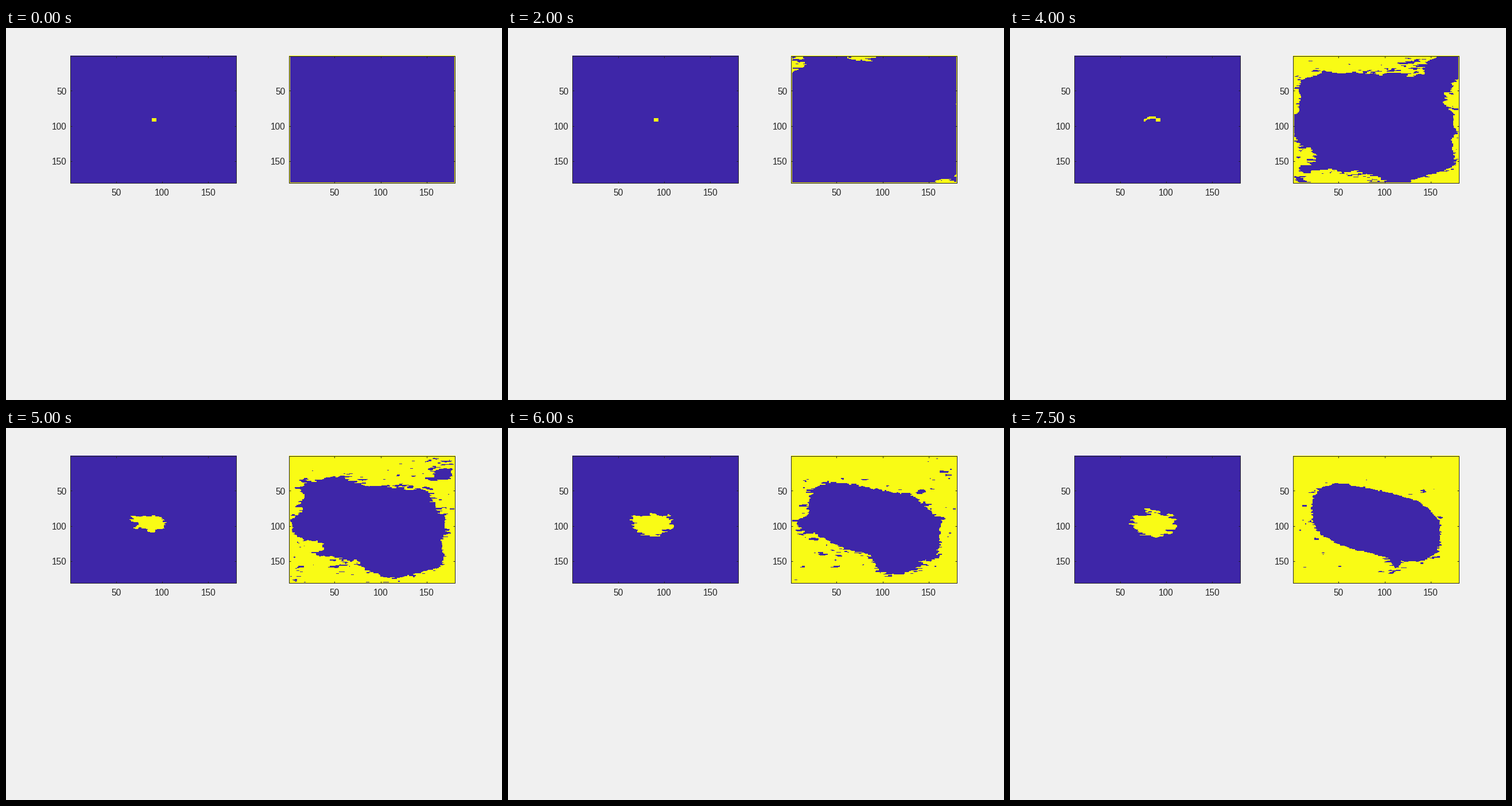
A matplotlib script that plays this animation: 864 px wide and 648 px high, repeating every 8000 ms.

```python
import numpy as np
import matplotlib.pyplot as plt
from matplotlib.animation import FuncAnimation
from matplotlib.colors import ListedColormap

W, H, DPI = 864, 648, 100
N, FRAMES, STEP = 180, 16, 500
INK = "#262626"
CMAP = ListedColormap(["#3e26a8", "#f9fb15"])
TOP, BOTTOM = 0.075 * H, 0.4162 * H
PANEL_W, LEFTS = 0.33466 * W, (0.13 * W, 0.57034 * W)

rng = np.random.default_rng(7)
Y, X = np.mgrid[0:N, 0:N] + 0.5


def streaks(kx, ky):
    """Unit-variance noise, smoothed more along rows than columns."""
    f = rng.standard_normal((N, N))
    for axis, k in ((1, kx), (0, ky)):
        f = np.apply_along_axis(np.convolve, axis, f, np.hanning(k + 2), "same")
    return f / f.std()


FINE = 0.75 * streaks(9, 2) + 0.65 * streaks(21, 7)
COARSE = streaks(45, 21)

# Places reached early or late: x, y, radius, delay in seconds
SPOTS = [
    (12, 10, 20, -1.7), (85, 8, 45, -0.8),
    (168, 176, 14, -1.2), (174, 68, 14, -0.9),
    (168, 18, 20, 2.0), (112, 160, 24, 2.3), (8, 100, 20, 1.8),
]


def connected(mask, seed):
    """Part of mask that can be reached from seed."""
    cur = seed.copy()
    while True:
        new = cur.copy()
        new[1:] |= cur[:-1]
        new[:-1] |= cur[1:]
        new[:, 1:] |= cur[:, :-1]
        new[:, :-1] |= cur[:, 1:]
        new &= mask | seed
        if (new == cur).all():
            return cur
        cur = new


def arrival():
    """Time at which the front from the walls fills each cell."""
    wall = np.minimum(np.minimum(X, N - X), np.minimum(Y, N - Y))
    dx, dy = X - 90, Y - 94 - 0.28 * (X - 90)
    core = np.cbrt(np.abs(dx / 71) ** 3 + np.abs(dy / 47) ** 3)
    core += 0.02 * FINE
    gap = 47 * np.maximum(core - 1, 0)
    time = 2.5 + 3 * wall / (wall + gap) + 60 * np.maximum(1 - core, 0)
    time += 0.3 * np.exp(0.9 * FINE) + 0.3 * COARSE
    for x, y, r, delay in SPOTS:
        time += delay * np.exp(-((X - x) ** 2 + (Y - y) ** 2) / r ** 2)
    return time


RING = np.zeros((N, N), bool)
RING[[0, -1]] = RING[:, [0, -1]] = True
SEED = np.zeros((N, N), bool)
SEED[88:93, 88:93] = True
ARRIVAL = arrival()


def outer(t):
    return connected(ARRIVAL < t, RING)


def inner(t):
    mask = SEED.copy()
    if t >= 2.5:
        # an arm arches out to the west
        s = np.clip(t - 3, 0, 1) ** 2
        arc = 87.3 + 0.05 * (X - 85) ** 2
        mask |= (X < 88) & (X > 85 - 10 * s) & (np.abs(Y - arc) < 0.6 + s)
    if t > 4:
        # then a ragged ellipse swells and drifts down
        s = min((t - 4) / 1.5, 1)
        cx, cy = 82 + 4 * s, 89 + 7 * s
        dx, dy = X - cx, Y - cy - 0.1 * (X - cx)
        reach = 18 * (1 - np.exp((4 - t) / 0.9))
        mask |= np.hypot(dx / 1.35, dy) < reach + 2.4 * FINE
    return connected(mask, SEED)


TIMES = np.arange(FRAMES) * STEP / 1000
MASKS = [np.logical_or.accumulate([grow(t) for t in TIMES])
         for grow in (inner, outer)]

plt.rcParams["font.family"] = "Liberation Sans"
fig = plt.figure(figsize=(W / DPI, H / DPI), dpi=DPI, facecolor="#f0f0f0")
ax = fig.add_axes([0, 0, 1, 1])
ax.axis("off")


def line(xs, ys):
    ax.plot(xs, ys, color=INK, lw=0.72, solid_capstyle="butt", zorder=3)


def label(x, y, text, ha):
    ax.text(x, y + 5.6, text, ha=ha, va="baseline", size=11.2, color=INK)


def panel(x0):
    x1 = x0 + PANEL_W
    img = ax.imshow(np.zeros((N, N)), cmap=CMAP, vmin=0, vmax=1,
                    extent=(x0, x1, BOTTOM, TOP), aspect="auto",
                    interpolation="nearest")
    line([x0, x1, x1, x0, x0], [TOP, TOP, BOTTOM, BOTTOM, TOP])
    for v in (50, 100, 150):
        f = (v - 0.5) / N
        x, y = x0 + f * PANEL_W, TOP + f * (BOTTOM - TOP)
        for edge, d in ((TOP, 3), (BOTTOM, -3)):
            line([x, x], [edge, edge + d])
        for edge, d in ((x0, 3), (x1, -3)):
            line([edge, edge + d], [y, y])
        label(x, BOTTOM + 16.6, str(v), "center")
        label(x0 - 6.5, y + 0.6, str(v), "right")
    return img


images = [panel(x0) for x0 in LEFTS]
ax.set_xlim(0, W)
ax.set_ylim(H, 0)


def update(i):
    for img, masks in zip(images, MASKS):
        img.set_data(masks[i].astype(float))
    return images


anim = FuncAnimation(fig, update, frames=FRAMES, interval=STEP,
                     repeat=True, repeat_delay=0, blit=False)
plt.show()
```
